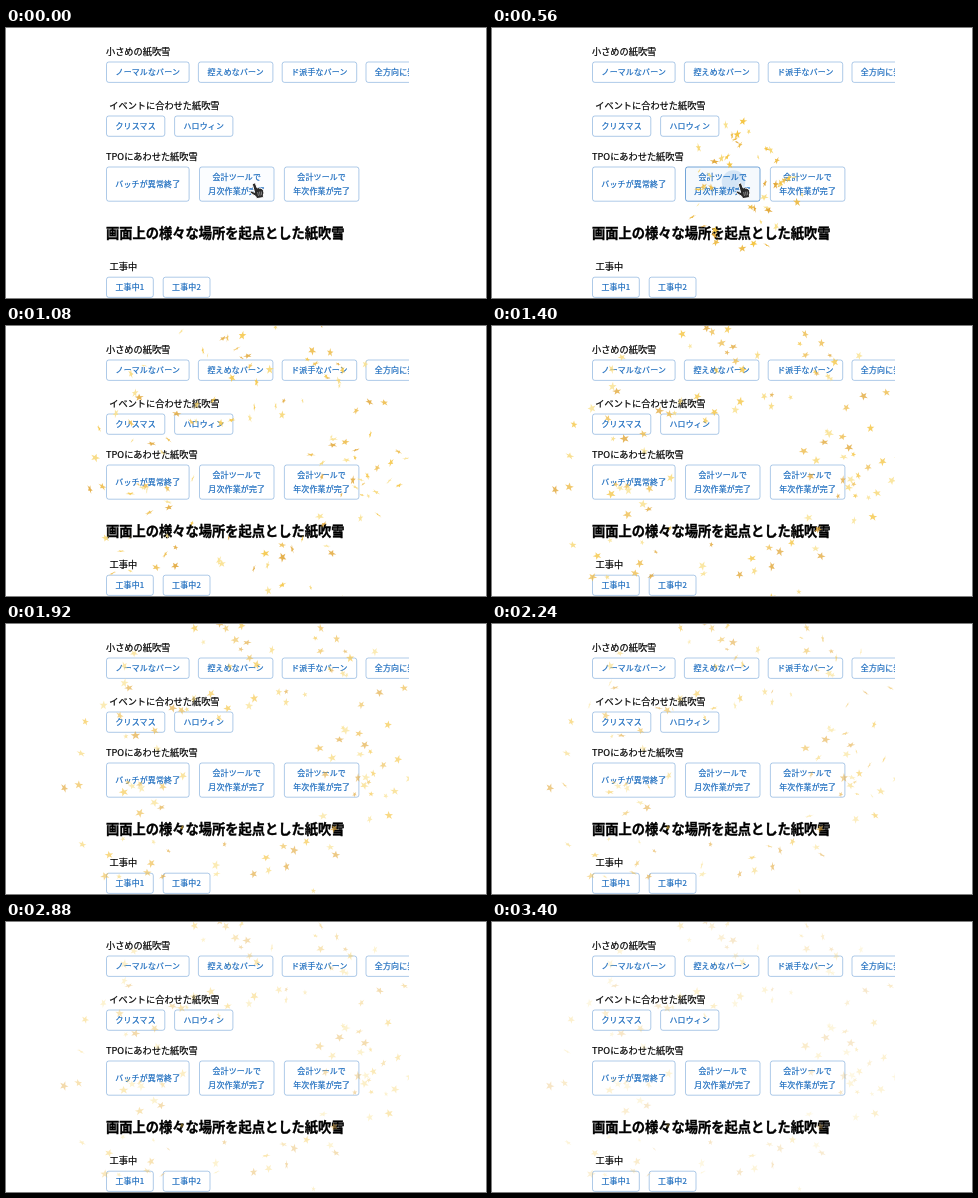
Animation of 480 by 270 pixels, one loop 3.92 s. Source, as an HTML page:

```html
<!DOCTYPE html>
<html lang="ja">
<head>
<meta charset="utf-8">
<title>紙吹雪</title>
<style>
  html, body { margin: 0; width: 100%; height: 100%; overflow: hidden; background: #fff; }
  svg { display: block; width: 100vw; height: 100vh; }
  text { font-family: "Noto Sans CJK JP", "Noto Sans CJK", sans-serif; font-size: 9.2px; fill: #000; stroke: #000; stroke-width: .2; }
  .title { font-size: 13.25px; font-weight: 700; stroke-width: .35; }
  .btn text { font-size: 7.95px; letter-spacing: .18px; fill: #1769bd; stroke: #1769bd; text-anchor: middle; }
  .btn rect { fill: none; stroke: #1769bd; stroke-opacity: .5; stroke-width: .7; }
</style>
</head>
<body>
<svg id="stage" viewBox="0 0 480 270">
  <defs>
    <clipPath id="page"><rect width="403" height="270"/></clipPath>
    <clipPath id="face"><rect x="193.5" y="139" width="74.5" height="34.2" rx="2.3"/></clipPath>
  </defs>
  <rect width="480" height="270" fill="#fff"/>
  <g clip-path="url(#page)">
    <g clip-path="url(#face)">
      <rect id="hover" x="193" y="138" width="77" height="36" fill="#1976d2"/>
      <circle id="ripple" cx="241.5" cy="154" fill="#1976d2"/>
    </g>
    <g id="ui"></g>
    <g id="stars"></g>
  </g>
  <g id="hand" stroke-linejoin="round" stroke-linecap="round">
    <path fill="#2a2a2a" stroke="#fff" stroke-width="1"
      d="M247.2 155.4C248.2 154.6 249.2 155 249.6 156L251.2 160L252.6 159.6L253.6 160.2L255 160L255.8 161L257 161.4C258 163.4 258 165.4 257.4 167L257.4 169.6L250.6 170.6L249.8 168.4L245 165.4C243.6 164.2 244.6 162.6 246.2 163.2L248.6 164.4L246.6 157.2C246.4 156.4 246.6 155.8 247.2 155.4Z"/>
    <path fill="none" stroke="#ddd" stroke-width=".5" d="M251.7 164.4l.7 3.2M253.5 164l.6 3.2M255.3 163.8l.4 3"/>
  </g>
</svg>
<script>
const NS = "http://www.w3.org/2000/svg";
const $ = id => document.getElementById(id);
const LOOP = 3920, STEP = 40, START = 520, END = 3400, LEAVE = 1080;
const OX = 250, OY = 158, COUNT = 150;
const COLORS = ["#f5c542", "#eebd4c", "#f7d774", "#e2a83a", "#f9e08c"];

function add(parent, tag, attrs, text) {
  const el = document.createElementNS(NS, tag);
  for (const key in attrs) el.setAttribute(key, attrs[key]);
  if (text) el.textContent = text;
  parent.appendChild(el);
  return el;
}

const label = (x, y, text, cls = "") => add($("ui"), "text", { x, y, class: cls }, text);

// button width follows from its longest line; digits are narrower
const lineWidth = s => [...s].reduce((w, c) => w + (c < "A" ? 4.7 : 8.1), 0);

function row(y, height, gap, ...captions) {
  let x = 100.5;
  return captions.map(caption => {
    const lines = caption.split("\n");
    const width = Math.max(...lines.map(lineWidth)) + 17.8;
    const g = add($("ui"), "g", { class: "btn" });
    const box = add(g, "rect", { x, y, width, height, rx: 2.3 });
    lines.forEach((line, i) => {
      const mid = y + height / 2 + (i - (lines.length - 1) / 2) * 14;
      add(g, "text", { x: x + width / 2, y: mid + 2.8 }, line);
    });
    x += width + gap;
    return box;
  });
}

label(100, 27, "小さめの紙吹雪");
row(34, 20.4, 9.3, "ノーマルなバーン", "控えめなバーン", "ド派手なバーン", "全方向に発射中");
label(103.3, 80.7, "イベントに合わせた紙吹雪");
row(88, 20.3, 9.8, "クリスマス", "ハロウィン");
label(100, 131.9, "TPOにあわせた紙吹雪");
const target = row(139, 34.2, 10.4, "バッチが異常終了", "会計ツールで\n月次作業が完了", "会計ツールで\n年次作業が完了")[1];
label(100, 210.4, "画面上の様々な場所を起点とした紙吹雪", "title");
label(103.6, 242.3, "工事中");
row(249.2, 20.2, 9.9, "工事中1", "工事中2");

let seed = 71;
function rnd() {
  seed = (seed * 16807) % 2147483647;
  return seed / 2147483647;
}

function starPath(r) {
  let d = "";
  for (let i = 0; i < 10; i++) {
    const a = i * Math.PI / 5 - Math.PI / 2, q = i % 2 ? r * .4 : r;
    d += (i ? "L" : "M") + (q * Math.cos(a)).toFixed(2) + " " + (q * Math.sin(a)).toFixed(2);
  }
  return d + "Z";
}

// three bursts in all directions; each star has its own reach
const stars = Array.from({ length: COUNT }, (_, i) => ({
  angle: (i + rnd()) * 2.39996,
  reach: 68 + rnd() * 132,
  born: 480 + (i % 3) * 100,
  turn: rnd() * 360, spin: (rnd() - .5) * 80,
  axis: rnd() * 180, phase: (rnd() - .5) * 2,
  el: add($("stars"), "path", {
    d: starPath(i % 5 ? 4.2 + rnd() * .9 : 3),
    fill: COLORS[Math.floor(rnd() * COLORS.length)]
  })
}));

function drawStar(s, t) {
  const age = (t - s.born) / 1000;
  const shown = t >= START && age > 0;
  s.el.setAttribute("display", shown ? "inline" : "none");
  if (!shown) return;
  const r = s.reach * (1 - Math.exp(-5 * age));
  const x = OX + r * Math.cos(s.angle), y = OY + r * Math.sin(s.angle);
  const flat = .18 + .72 * Math.abs(Math.cos(6 * (t / 1000 - 1.4) + s.phase));
  s.el.setAttribute("transform",
    `translate(${x} ${y}) rotate(${s.axis}) scale(1 ${flat}) rotate(${s.turn + s.spin * age})`);
  s.el.setAttribute("opacity", Math.max(0, 1 - age / 3.8));
}

function draw(now) {
  const raw = now % LOOP;
  const t = raw < START ? 0 : Math.min(END, START + Math.floor((raw - START) / STEP) * STEP);
  const over = t < LEAVE, pressed = t >= START && over;
  $("hand").setAttribute("display", over ? "inline" : "none");
  $("hover").setAttribute("opacity", pressed ? .045 : over ? .015 : 0);
  target.style.strokeOpacity = pressed ? .85 : .5;
  const grow = Math.min(1, Math.max(0, (t - 480) / 280));
  $("ripple").setAttribute("r", 24 * (1 - (1 - grow) ** 2));
  $("ripple").setAttribute("opacity", pressed ? .15 * Math.min(1, (LEAVE - t) / 160) : 0);
  stars.forEach(s => drawStar(s, t));
}

const begin = performance.now();
function tick() {
  draw(performance.now() - begin);
  requestAnimationFrame(tick);
}
tick();
</script>
</body>
</html>
```
